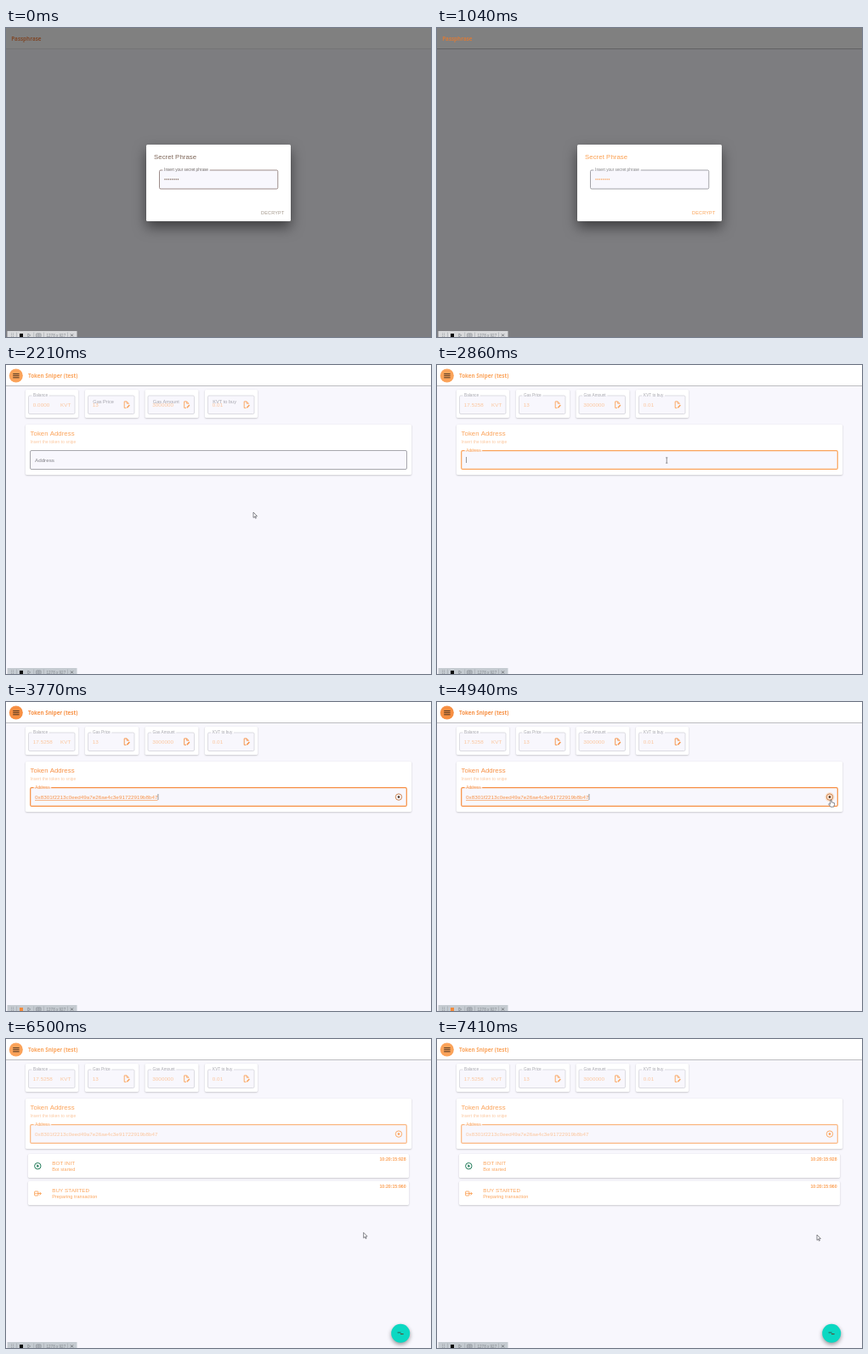
These frames come from a looping animation (500 by 363 pixels, 8000 ms). An HTML page with a canvas:

```html
<!DOCTYPE html>
<html lang="en">
<head>
<meta charset="utf-8">
<title>Token tool demo</title>
<style>
html, body { margin: 0; width: 100%; height: 100%; overflow: hidden; background: #f8f7fd; }
canvas { display: block; width: 100%; height: 100%; }
</style>
</head>
<body>
<canvas id="stage"></canvas>
<script>
const W = 500, H = 363, LOOP = 8000, TICK = 130;
const SANS = '"Liberation Sans", Arial, sans-serif';
const TITLE = '"Open Sans", "Noto Sans", sans-serif';
const COIN = 'KVT';
const ADDRESS = '0x8301f2213c0eed49a7e26ae4c3e91722919b8b47';
const FIELD = '#f8f7fd', GREY = '#a5a5ad', PALE = '#fbc59b';

// Key times in ms
const T = { open: 2210, loaded: 2340, focus: 2860, paste: 3510, run: 5200 };

const canvas = document.getElementById('stage');
const ctx = canvas.getContext('2d');
const ratio = window.devicePixelRatio || 1;
canvas.width = W * ratio;
canvas.height = H * ratio;

// Pointer keys: time, x, y of the tip, shape
const pointer = [
  [1300, 262, 196, 'arrow'], [1690, 312, 215, 'hand'], [1950, 316, 216, 'hand'],
  [2080, 316, 216, 'hand'], [2210, 291, 173, 'arrow'], [2600, 276, 130, 'arrow'],
  [2730, 271, 112, 'beam'], [3250, 268, 112, 'beam'], [3510, 0, 0, 'none'],
  [3900, 275, 113, 'beam'], [4160, 340, 116, 'beam'], [4550, 440, 117, 'beam'],
  [4680, 463, 115, 'hand'], [5200, 463, 115, 'hand'], [5330, 438, 184, 'arrow'],
  [5460, 407, 226, 'arrow'], [6240, 408, 226, 'arrow'], [7020, 446, 230, 'arrow'],
  [7410, 447, 230, 'arrow'], [8000, 447, 230, 'arrow']
];

function mix(a, b, k) {
  const part = i => Math.round(a[i] + (b[i] - a[i]) * k);
  return `rgb(${part(0)},${part(1)},${part(2)})`;
}

function text(str, x, y, size, color, opt = {}) {
  ctx.font = `${opt.weight || 400} ${size}px ${opt.font || SANS}`;
  ctx.letterSpacing = (opt.space || 0) + 'px';
  ctx.textAlign = opt.align || 'left';
  ctx.fillStyle = color;
  ctx.fillText(str, x, y);
}

function rect(x, y, w, h, color) {
  ctx.fillStyle = color;
  ctx.fillRect(x, y, w, h);
}

function box(x, y, w, h, r, fill, stroke, width = 0.8) {
  ctx.beginPath();
  ctx.roundRect(x, y, w, h, r);
  if (fill) { ctx.fillStyle = fill; ctx.fill(); }
  if (stroke) { ctx.strokeStyle = stroke; ctx.lineWidth = width; ctx.stroke(); }
}

function disc(x, y, r, fill, stroke, width = 1) {
  ctx.beginPath();
  ctx.arc(x, y, r, 0, Math.PI * 2);
  if (fill) { ctx.fillStyle = fill; ctx.fill(); }
  if (stroke) { ctx.strokeStyle = stroke; ctx.lineWidth = width; ctx.stroke(); }
}

function path(points, { fill, stroke, width = 1, close = false }) {
  ctx.beginPath();
  points.forEach(([x, y], i) => i ? ctx.lineTo(x, y) : ctx.moveTo(x, y));
  if (close) ctx.closePath();
  if (fill) { ctx.fillStyle = fill; ctx.fill(); }
  if (stroke) { ctx.strokeStyle = stroke; ctx.lineWidth = width; ctx.stroke(); }
}

function shadow(blur, dy, alpha, draw) {
  ctx.save();
  ctx.shadowColor = `rgba(0,0,0,${alpha})`;
  ctx.shadowBlur = blur * ratio;
  ctx.shadowOffsetY = dy * ratio;
  draw();
  ctx.restore();
}

function card(x, y, w, h) {
  shadow(2, 0.8, 0.22, () => box(x, y, w, h, 1.5, '#fff'));
}

// Outlined field with a gap in the top border for its label
function field(x, y, w, h, border, width, label, labelColor, back) {
  box(x, y, w, h, 1.5, FIELD, border, width);
  if (!label) return;
  ctx.font = `4.69px ${SANS}`;
  ctx.letterSpacing = '0px';
  const gap = ctx.measureText(label).width + 3.4;
  rect(x + 3.9, y - 1, gap, 1, back);
  rect(x + 3.9, y, gap, 1, FIELD);
  text(label, x + 5.6, y + 1.3, 4.69, labelColor);
}

function drawDialog(t) {
  const k = Math.min(1, t / 650);
  const accent = mix([126, 102, 88], [251, 160, 82], k);
  rect(0, 0, W, H, '#7d7d80');
  rect(0, 0, W, 24, '#808080');
  rect(0, 24, W, 1, mix([116, 116, 118], [98, 98, 100], k));
  text('Passphrase', 6.2, 15.3, 6.25, mix([126, 72, 42], [214, 122, 58], k), { weight: 700, font: TITLE });

  shadow(15, 7, 0.5, () => box(165, 137, 170, 90, 1.6, '#fff'));
  text('Secret Phrase', 174, 154, 7.8, accent, { space: 0.06 });
  const border = mix([134, 112, 108], [140, 140, 146], k);
  field(180.5, 167, 139.3, 22, border, 0.8, 'Insert your secret phrase', mix([108, 100, 100], [128, 128, 132], k), '#fff');
  for (let i = 0; i < 8; i++) disc(187 + i * 2.2, 177.8, 0.75, accent);

  const hover = t >= 1690;
  if (hover) box(297, 210, 35, 14, 1.6, t >= 1950 ? '#fdcf9d' : '#fef1e4');
  const color = t >= 1950 ? '#f6bd83' : mix([160, 148, 135], [251, 160, 82], k);
  text('DECRYPT', 300, 219, 5.47, color, { space: 0.2 });
}

function editIcon(x, y, color) {
  path([[x + 2.6, y - 1.3], [x + 0.2, y - 3.7], [x - 2.7, y - 3.7], [x - 2.7, y + 3.8], [x - 0.4, y + 3.8]],
    { stroke: color, width: 0.9 });
  path([[x + 0.2, y - 3.7], [x + 0.2, y - 1.3], [x + 2.6, y - 1.3]], { stroke: color, width: 0.8 });
  path([[x + 0.5, y + 3.6], [x + 3.4, y + 0.4]], { stroke: color, width: 1.5 });
}

function drawStat(x, w, label, value, t, accent, editable) {
  card(x, 29, w, 33);
  const floating = !editable || t >= T.loaded;
  const fx = x + 3.5;
  field(fx, 36, 54.5, 21.5, '#cfcfd6', 0.7, floating ? label : '', GREY, '#fff');
  if (!floating) text(label, fx + 5.8, 45, 5.6, GREY);
  text(value, fx + 5.3, 48.8, 6.25, PALE, { space: 0.05 });
  if (editable) editIcon(fx + 45.4, 46.6, accent);
  else text(COIN, fx + 49.7, 48.5, 6.25, PALE, { align: 'right' });
}

function drawAddress(t, accent) {
  card(23, 70, 454, 59);
  text('Token Address', 28.6, 83, 7.8, accent, { space: 0.03 });
  text('Insert the token to snipe', 28.6, 91.7, 4.69, PALE, { space: 0.15 });
  const focused = t >= T.focus, pasted = t >= T.paste, running = t >= T.run;
  if (!focused) {
    field(28.5, 100.5, 443, 22, '#929298', 0.8);
    text('Address', 34, 114, 6.25, '#828288');
    return;
  }
  field(28.7, 100.7, 442.6, 21.7, running ? '#fbb781' : accent, 1.2, 'Address', accent, '#fff');
  let end = 34;
  if (pasted) {
    text(ADDRESS, 34, 114, 6.25, running ? PALE : accent, { space: 0.03 });
    end += ctx.measureText(ADDRESS).width;
    if (!running) rect(34, 115, end - 34, 0.6, accent);
    if (t >= 4680 && !running) disc(462, 111.6, 5.6, '#fbe3d0');
    disc(462, 111.6, 3.7, null, running ? accent : '#c97b44', 0.9);
    disc(462, 111.6, 1.3, running ? accent : '#4a3426');
  }
  const caretOn = pasted ? true : Math.floor((t - T.focus) / 390) % 2 === 0;
  if (!running && caretOn) rect(end + 0.2, 108, 0.6, 7, '#555');
}

function drawLog(y, title, note, time, accent) {
  card(26, y, 448, 28);
  text(title, 54.3, y + 12.9, 6.25, accent, { space: 0.05 });
  text(note, 54.3, y + 19.6, 5.47, accent, { space: 0.05 });
  text(time, 470.6, y + 8.2, 5.2, accent, { align: 'right', weight: 700 });
}

function drawRun(accent) {
  drawLog(135, 'BOT INIT', 'Bot started', '10:20:15:928', accent);
  disc(37.3, 149.2, 3.7, null, '#1f7a58', 1);
  path([[36.3, 147.3], [39.2, 149.2], [36.3, 151.1]], { fill: '#1f7a58', close: true });
  drawLog(167, 'BUY STARTED', 'Preparing transaction', '10:20:15:960', accent);
  box(33.6, 179, 4.2, 5, 0.5, null, accent, 0.9);
  rect(34, 181, 3.6, 0.7, accent);
  path([[37, 181.6], [41.2, 181.6]], { stroke: accent, width: 1 });
  path([[39.6, 179.8], [41.4, 181.6], [39.6, 183.4]], { stroke: accent, width: 0.9 });

  shadow(5, 2.2, 0.4, () => disc(464.2, 345.8, 11, '#0bd8c2'));
  rect(460.6, 344.4, 4, 1, '#2b5a50');
  rect(464, 346, 3.6, 1.1, '#5c4a34');
}

function drawApp(t) {
  const strong = t >= T.paste && t < T.run;
  const accent = strong ? '#f78f42' : '#fba35a';
  rect(0, 0, W, H, FIELD);
  rect(0, 0, W, 24, '#fff');
  rect(0, 24, W, 1, '#bcbcc0');
  disc(11.8, 12.5, 8, accent);
  for (const y of [10, 12.2, 14.4]) rect(8.2, y, 7.4, 0.9, '#3a2a1c');
  text('Token Sniper (test)', 26, 15.2, 6.25, accent, { weight: 700, font: TITLE });

  drawStat(23, 62, 'Balance', t < T.loaded ? '0.0000' : '17.5258', t, accent, false);
  drawStat(93, 63, 'Gas Price', '13', t, accent, true);
  drawStat(163.5, 63, 'Gas Amount', '3000000', t, accent, true);
  drawStat(234, 62, COIN + ' to buy', '0.01', t, accent, true);
  drawAddress(t, accent);
  if (t >= T.run) drawRun(accent);
}

function drawRecorder(t) {
  const ink = '#858a90';
  rect(1.5, 356, 82, 7, t < T.open ? '#d9dadc' : '#c5cbd1');
  for (let y = 358.5; y < 363; y += 1.8) {
    rect(6, y, 0.8, 0.8, ink);
    rect(8, y, 0.8, 0.8, ink);
  }
  for (const x of [12, 32.5, 44, 72]) rect(x, 357.5, 0.6, 5.5, '#a4a9ae');
  const strong = t >= T.paste && t < T.run;
  rect(16, 359, 4, 4, strong ? '#f28a3c' : '#080808');
  path([[25.8, 359], [28.8, 361], [25.8, 363]], { stroke: ink, width: 0.7, close: true });
  box(35.6, 359, 5.4, 4, 0.6, null, ink, 0.8);
  disc(38.3, 361, 1.1, null, ink, 0.7);
  text('1278 x 927', 47.5, 362.8, 4.6, ink);
  path([[76, 359.4], [79, 362.4]], { stroke: '#606468', width: 0.8 });
  path([[79, 359.4], [76, 362.4]], { stroke: '#606468', width: 0.8 });
}

const shapes = {
  arrow: [[0, 0], [0, 6.4], [1.5, 5], [2.5, 7.2], [3.4, 6.8], [2.4, 4.7], [4.4, 4.5]],
  hand: [[0, 0], [1, 0], [1.3, 2.8], [4.4, 3.6], [4.6, 5.4], [3.7, 8.2], [0, 8.2], [-2.3, 4.8], [-1.6, 4.2], [-0.3, 5.2]]
};

function drawPointer(t) {
  const i = pointer.findLastIndex(key => key[0] <= t);
  if (i < 0 || pointer[i][3] === 'none') return;
  const a = pointer[i], b = pointer[i + 1] || a;
  const k = b[3] === 'none' || a === b ? 0 : (t - a[0]) / (b[0] - a[0]);
  ctx.save();
  ctx.translate(a[1] + (b[1] - a[1]) * k, a[2] + (b[2] - a[2]) * k);
  if (a[3] === 'beam') {
    path([[0, -3.2], [0, 3.2]], { stroke: '#666', width: 0.7 });
    for (const y of [-3.2, 3.2]) path([[-1.2, y], [1.2, y]], { stroke: '#666', width: 0.6 });
  } else {
    path(shapes[a[3]], { fill: '#fff', stroke: '#55555c', width: 0.7, close: true });
  }
  ctx.restore();
}

function frame(now) {
  const t = Math.floor((now % LOOP) / TICK) * TICK;
  ctx.setTransform(ratio, 0, 0, ratio, 0, 0);
  if (t < T.open) drawDialog(t);
  else drawApp(t);
  drawRecorder(t);
  drawPointer(t);
  requestAnimationFrame(frame);
}

requestAnimationFrame(frame);
</script>
</body>
</html>
```
